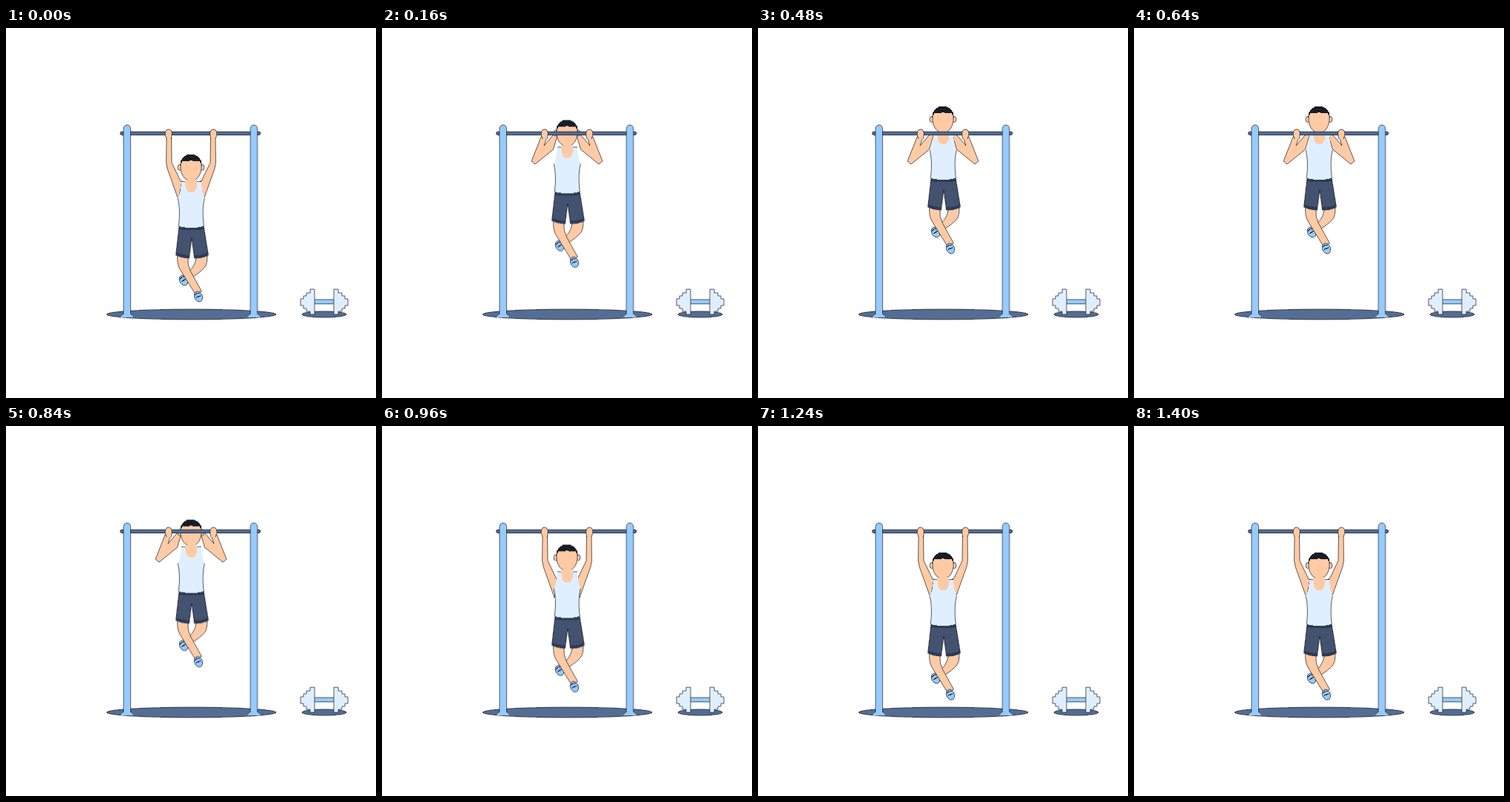
An HTML page without scripts that plays this animation: 500x500 px, repeating every 1640 ms.

```html
<!DOCTYPE html>
<html lang="en">
<head>
<meta charset="utf-8">
<title>Pull-ups</title>
<style>
  html, body { margin: 0; width: 100%; height: 100%; overflow: hidden; background: #fff; }
  svg { display: block; width: 100vw; height: 100vh; shape-rendering: crispEdges; }

  .line { stroke: #171c26; stroke-width: .7; stroke-linejoin: round; }
  .skin { fill: #ffcaa4; }
  .pale { fill: #dfefff; }
  .blue { fill: #97cbff; }
  .slate { fill: #546d92; }
  .navy { fill: #43526f; }
  .deep { fill: #2c3c58; }
  .hair { fill: #171c26; }

  .body, .arm { animation: lift 1640ms cubic-bezier(.25, .1, .25, 1.07) infinite; }
  .arm { animation-name: bend; }

  /* pull for 400 ms, hold, then drop for 400 ms from 760 ms */
  @keyframes lift {
    0%, 70.73%, 100% { transform: translateY(0); }
    24.39%, 46.34% { transform: translateY(-65px); }
  }
  @keyframes bend {
    0%, 70.73%, 100% { d: path("M217 147L216.5 182L218 190L233 232L238 207H236L224 182L223.5 147Z"); }
    24.39%, 46.34% { d: path("M215 147L202 180L207 184L231.5 164L238 142L231 145L219 159L223 147Z"); }
  }
</style>
</head>
<body>
<svg viewBox="0 0 500 500">
  <defs>
    <path id="hand" class="skin line" d="M217 150Q214 144 215.5 140Q217 136.5 220 136.8Q224 137.5 224.3 142Q224.3 146 223.2 150"/>
    <g id="pole">
      <path class="blue line" d="M158.8 389V136a4.8 5 0 0 1 9.6 0V389Z"/>
      <path class="blue" d="M155 391l3-4h11l3 4Z"/>
    </g>
    <path id="weight" class="pale line" d="M417 353h-6v5h-5v4h-4v4h-4v9h4v4h4v4h5v4h6Z"/>
    <g id="shoe">
      <ellipse class="blue line" rx="5.3" ry="7.3"/>
      <path d="M-3.5-3.5Q0-6 3.5-3.5M-3.5 0H3.5" fill="none" stroke="#2c3c58" stroke-width="1.4"/>
    </g>
  </defs>

  <ellipse class="slate line" cx="250.5" cy="387" rx="114.5" ry="7"/>
  <ellipse class="slate line" cx="430" cy="387" rx="30" ry="4.2"/>
  <rect class="blue line" x="416" y="367" width="28" height="5.8"/>
  <use href="#weight"/>
  <use href="#weight" transform="matrix(-1 0 0 1 860 0)"/>

  <path class="arm skin line"/>
  <g transform="matrix(-1 0 0 1 500 0)"><path class="arm skin line"/></g>

  <g class="body">
    <use href="#shoe" transform="translate(240 341) rotate(-28)"/>
    <path class="skin line" d="M257 311L272 308Q272 318 269.5 322Q263 331 246 340L242 333Q255 325 257 311Z"/>
    <path class="skin line" d="M231.5 307L246 311Q245 320 249 328L264.5 356L256 360L235 326Q231 319 231.5 307Z"/>
    <use href="#shoe" transform="translate(260 363) rotate(-22)"/>

    <path class="navy line" d="M234 267H267L273.5 307Q264 312 254.5 311L251 284L247.5 311Q238 311 229.5 307Z"/>
    <path class="deep" d="M234 267H267L267.7 272Q250 275 233.3 272ZM230.2 303Q239 307 248.3 307L247.5 311Q238 311 229.5 307ZM254 307Q264 308 272.8 303L273.5 307Q264 312 254.5 311Z"/>

    <path class="pale" d="M237 207.5H264Q264.5 222 268.3 230Q264.5 245 267.3 268Q250 272 233.3 268Q236 245 232.2 230Q236.5 222 237 207.5Z"/>
    <path class="line" fill="none" d="M268.3 230Q264.5 245 267.3 268M233.3 268Q236 245 232.2 230M237 207.5H243M258 207.5H264"/>

    <ellipse class="skin line" cx="234.7" cy="188.5" rx="2.6" ry="4"/>
    <ellipse class="skin line" cx="265.3" cy="188.5" rx="2.6" ry="4"/>
    <path class="skin line" d="M236 184Q236 173 250 173T264 184Q265 197 258 203.5Q250 210 242 203.5Q235 197 236 184Z"/>
    <path class="skin" d="M242.3 207L244.5 206V200H256V206L258.5 207Q258.5 222 250.3 222.5Q242.3 222 242.3 207Z"/>
    <path class="hair" d="M235.2 187C234 165 266 165 264.8 187Q263.5 182 261 179.5Q255 181.5 250 178.8Q245 181.5 239 179.5Q236.5 182 235.2 187Z"/>
  </g>

  <rect class="slate line" x="154.3" y="140.2" width="189.5" height="4.4" rx="2"/>
  <use href="#hand"/>
  <use href="#hand" transform="matrix(-1 0 0 1 500 0)"/>
  <use href="#pole"/>
  <use href="#pole" transform="matrix(-1 0 0 1 498.6 0)"/>
</svg>
</body>
</html>
```
